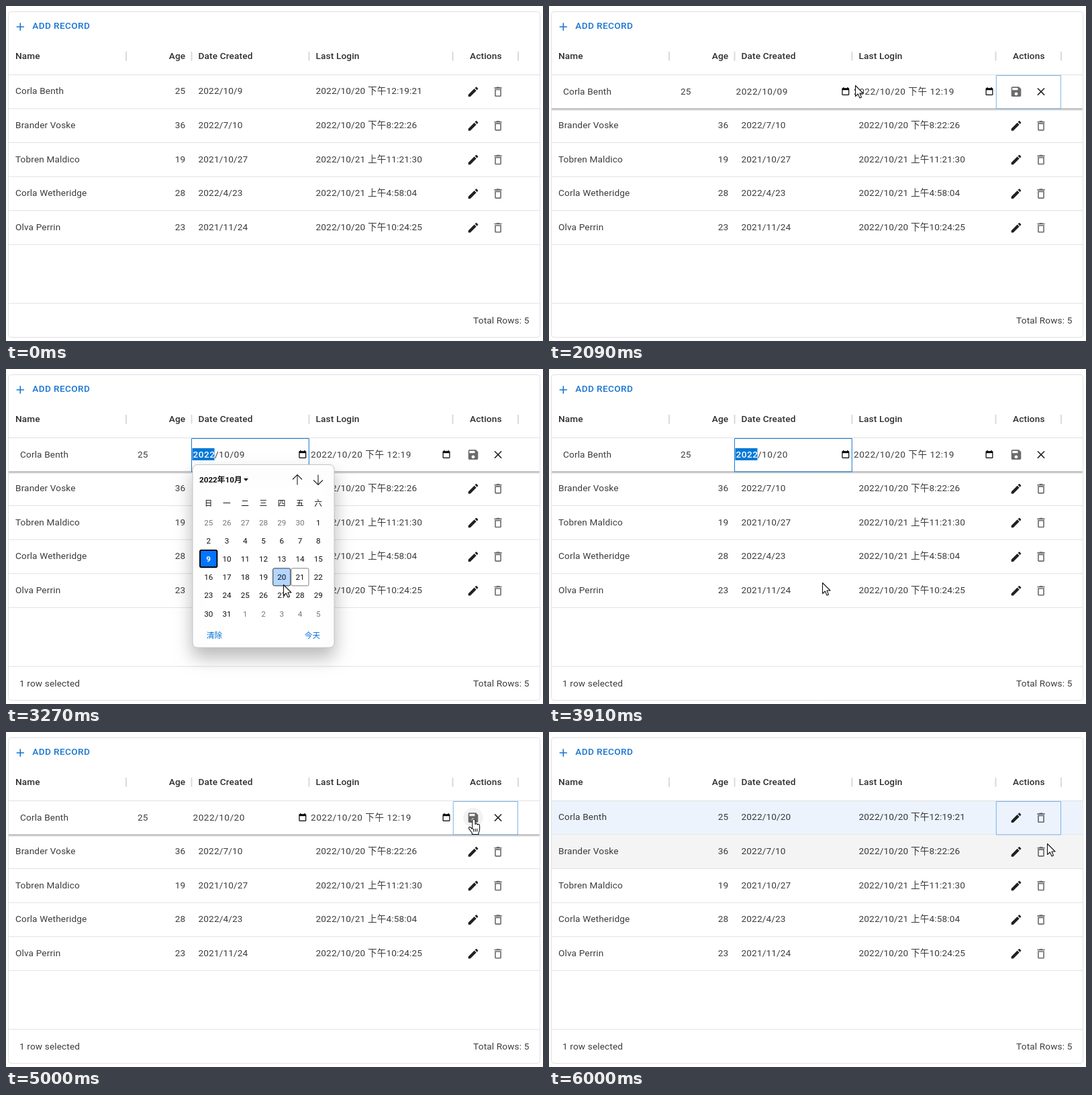
An HTML page with a canvas that plays this animation: 800x499 px, repeating every 6090 ms.

```html
<!DOCTYPE html>
<html lang="en">
<head>
<meta charset="utf-8">
<title>Editable data grid</title>
<style>
html, body { margin: 0; width: 100%; height: 100%; overflow: hidden; background: #fff; }
canvas { display: block; }
</style>
</head>
<body>
<canvas id="stage" width="800" height="499"></canvas>
<script>
const ctx = document.getElementById('stage').getContext('2d');
const LOOP = 6090, STEP = 1000 / 11;
const FAMILY = 'Roboto, "Noto Sans CJK TC", "Noto Sans CJK SC", "Noto Sans CJK JP", sans-serif';
const INK = 'rgba(0,0,0,.87)', BODY = 'rgba(0,0,0,.77)', MUTED = 'rgba(0,0,0,.58)';
const LINE = '#e0e0e0', BLUE = '#1976d2';
const ROW_TOP = 102.5, ROW_H = 50.6, EDIT_X = 696, SECOND_X = 733;

const rows = [
  ['Corla Benth', 25, '2022/10/9', '2022/10/20 下午12:19:21'],
  ['Brander Voske', 36, '2022/7/10', '2022/10/20 下午8:22:26'],
  ['Tobren Maldico', 19, '2021/10/27', '2022/10/21 上午11:21:30'],
  ['Corla Wetheridge', 28, '2022/4/23', '2022/10/21 上午4:58:04'],
  ['Olva Perrin', 23, '2021/11/24', '2022/10/20 下午10:24:25']
];

// Pointer path: step, x, y
const path = [
  [1, 550, 484], [4, 632, 285], [7, 697, 143], [8, 698, 137], [9, 699, 133], [13, 699, 133],
  [17, 587, 133], [23, 456, 118], [24, 449, 113], [25, 445, 120], [26, 443, 124], [30, 443, 124],
  [33, 436, 215], [36, 413, 321], [37, 411, 322], [39, 404, 319], [40, 407, 318], [46, 407, 318],
  [47, 490, 268], [48, 630, 168], [49, 740, 97], [50, 740, 97], [53, 700, 136], [55, 697, 130],
  [58, 697, 130], [63, 766, 226], [66, 742, 166]
];

const icons = {
  add: 'M19 13h-6v6h-2v-6H5v-2h6V5h2v6h6z',
  edit: 'M3 17.25V21h3.75L17.81 9.94l-3.75-3.75zM20.71 7.04c.39-.39.39-1.02 0-1.41l-2.34-2.34c-.39-.39-1.02-.39-1.41 0l-1.83 1.83 3.75 3.75z',
  trash: 'M6 19c0 1.1.9 2 2 2h8c1.1 0 2-.9 2-2V7H6zM8 9h8v10H8zM15.5 4l-1-1h-5l-1 1H5v2h14V4z',
  save: 'M17 3H5c-1.1 0-2 .9-2 2v14c0 1.1.9 2 2 2h14c1.1 0 2-.9 2-2V7zM12 19c-1.66 0-3-1.34-3-3s1.34-3 3-3 3 1.34 3 3-1.34 3-3 3zM15 9H5V5h10z',
  close: 'M19 6.4 17.6 5 12 10.6 6.4 5 5 6.4 10.6 12 5 17.6 6.4 19 12 13.4 17.6 19 19 17.6 13.4 12z',
  calendar: 'M19 4h-1V2h-2v2H8V2H6v2H5c-1.1 0-2 .9-2 2v14c0 1.1.9 2 2 2h14c1.1 0 2-.9 2-2V6c0-1.1-.9-2-2-2zM5 9h14v11H5z'
};
for (const k in icons) icons[k] = new Path2D(icons[k]);
const arrowShape = new Path2D('M.5 .5V16.5L4.3 13 7 19 9.5 17.9 7 12H12Z');
const handShape = new Path2D('M-2.2 2Q-2 0 0 0T2 2V7.5Q2.4 6.4 4 6.6T5.4 8.2Q6 7.2 7.2 7.6T8.6 9.6V15Q8.4 18 7 20V22.5H-2.6V20.5L-7 14.6Q-8.2 12.6-6.8 11.8T-3.8 13L-2.2 14.5Z');

function text(str, x, y, { size = 13.62, weight = 400, color = BODY, align = 'left', gap = .146 } = {}) {
  ctx.font = `${weight} ${size}px ${FAMILY}`;
  ctx.letterSpacing = gap + 'px';
  ctx.textAlign = align;
  ctx.fillStyle = color;
  ctx.fillText(str, x, y);
}

function rect(x, y, w, h, color) {
  ctx.fillStyle = color;
  ctx.fillRect(x, y, w, h);
}

function box(x, y, w, h, stroke, width = 1, radius = 0, fill) {
  ctx.beginPath();
  ctx.roundRect(x, y, w, h, radius);
  if (fill) { ctx.fillStyle = fill; ctx.fill(); }
  ctx.lineWidth = width;
  ctx.strokeStyle = stroke;
  ctx.stroke();
}

function disc(x, y, r, color) {
  ctx.beginPath();
  ctx.arc(x, y, r, 0, 7);
  ctx.fillStyle = color;
  ctx.fill();
}

function icon(name, x, y, color, size = 19.46) {
  ctx.save();
  ctx.translate(x - size / 2, y - size / 2);
  ctx.scale(size / 24, size / 24);
  ctx.fillStyle = color;
  ctx.fill(icons[name], 'evenodd');
  ctx.restore();
}

function pointerAt(n) {
  if (n < 1) return null;
  const i = path.findIndex(p => p[0] >= n);
  const b = path[i], a = path[Math.max(0, i - 1)];
  const k = b === a ? 0 : (n - a[0]) / (b[0] - a[0]);
  return { x: a[1] + (b[1] - a[1]) * k, y: a[2] + (b[2] - a[2]) * k };
}

const rowCenter = i => 127.6 + ROW_H * i;
const near = (p, x, y) => p && Math.hypot(p.x - x, p.y - y) < 15;

function drawFrame(selected) {
  box(3.5, 8.5, 792, 485, LINE, 1, 4);
  icon('add', 21.3, 31, BLUE);
  text('ADD RECORD', 39.3, 34, { weight: 500, color: BLUE, gap: .39 });
  const head = { weight: 500, color: 'rgba(0,0,0,.82)' };
  text('Name', 14, 79, head);
  text('Age', 267.3, 79, { ...head, align: 'right' });
  text('Date Created', 286.5, 79, head);
  text('Last Login', 461.5, 79, head);
  text('Actions', 714.8, 79, { ...head, align: 'center' });
  for (const x of [179, 276.5, 451.5, 665.5, 763]) rect(x - 1, 68, 2, 13.6, '#dadada');
  rect(4, 102, 791, 1, LINE);
  rect(4, 442.5, 791, 1, LINE);
  if (selected) text('1 row selected', 20, 473);
  text('Total Rows: 5', 779.5, 473, { align: 'right' });
}

// The round highlight fades in during the first step of hovering.
function drawActions(names, colors, y, n) {
  [EDIT_X, SECOND_X].forEach((x, i) => {
    if (n >= 11 && near(pointerAt(n), x, y)) {
      disc(x, y, 14.8, `rgba(0,0,0,${near(pointerAt(n - 1), x, y) ? .05 : .015})`);
    }
    icon(names[i], x, y, colors[i]);
  });
}

function drawRow(i, date, n) {
  const [name, age, , login] = rows[i], y = rowCenter(i) + 3.8;
  text(name, 14, y);
  text(age, 267.3, y, { align: 'right' });
  text(date, 286.5, y);
  text(login, 461.5, y);
  drawActions(['edit', 'trash'], [INK, MUTED], rowCenter(i) + .2, n);
}

function drawEditor(date, focused, n) {
  const y = 132, wide = { gap: .5 };
  const shade = ctx.createLinearGradient(0, 152.5, 0, 156.5);
  shade.addColorStop(0, 'rgba(0,0,0,.28)');
  shade.addColorStop(.4, 'rgba(0,0,0,.2)');
  shade.addColorStop(1, 'rgba(0,0,0,0)');
  rect(4, 152.5, 790.5, 4, shade);
  text(rows[0][0], 21, y);
  text('25', 211.5, y, { align: 'right' });
  if (focused) {
    rect(277.5, 118, 33, 18, '#0078d7');
    text('2022', 278.5, y, { gap: .5, weight: 500, color: '#fff' });
    text(date.slice(4), 311, y, wide);
  } else {
    text(date, 278.5, y, wide);
  }
  text('2022/10/20 下午 12:19', 454, y, wide);
  icon('calendar', 441.8, 127, '#000', 14.6);
  icon('calendar', 656, 127, '#000', 14.6);
  drawActions(['save', 'close'], [MUTED, INK], 127.6, n);
}

function drawArrow(x, y, dir) {
  ctx.beginPath();
  ctx.moveTo(x, y - 7.5 * dir);
  ctx.lineTo(x, y + 7.5 * dir);
  ctx.moveTo(x - 7, y + .5 * dir);
  ctx.lineTo(x, y + 7.5 * dir);
  ctx.lineTo(x + 7, y + .5 * dir);
  ctx.lineWidth = 1.1;
  ctx.strokeStyle = '#222';
  ctx.stroke();
}

function drawCalendar(pointer) {
  ctx.save();
  ctx.shadowColor = 'rgba(0,0,0,.27)';
  ctx.shadowBlur = 26;
  ctx.shadowOffsetY = 14;
  box(278, 142.5, 211, 272.5, '#c4c4c4', 1, 7, '#fff');
  ctx.restore();
  const small = { size: 11.7, gap: 0, align: 'center', color: '#101010' };
  text('2022年10月', 288, 169, { ...small, align: 'left', weight: 700 });
  ctx.beginPath();
  ctx.moveTo(354, 163);
  ctx.lineTo(361, 163);
  ctx.lineTo(357.5, 167);
  ctx.fillStyle = '#111';
  ctx.fill();
  drawArrow(434, 165, -1);
  drawArrow(465, 165, 1);
  [...'日一二三四五六'].forEach((d, c) => text(d, 301.7 + 27.25 * c, 203.7, small));
  for (let i = 0; i < 42; i++) {
    const x = 301.7 + 27.25 * (i % 7), y = 228.3 + 27.2 * Math.floor(i / 7);
    const day = i - 5, inMonth = day > 0 && day < 32;
    const label = day < 1 ? day + 30 : day > 31 ? day - 31 : day;
    const hovered = Math.abs(pointer.x - x) < 13.6 && Math.abs(pointer.y - y) < 13.6;
    if (day === 9) box(x - 12.7, y - 12.8, 25.4, 25.4, '#000', 1.9, 2, '#0075ff');
    else if (hovered) box(x - 13, y - 13, 26, 26, '#333', 1, 2, '#b3d6ff');
    else if (day === 21) box(x - 13, y - 13, 26, 26, '#808080', 1, 2);
    text(label, x, y + 4.2, {
      ...small,
      weight: day === 9 ? 700 : 400,
      color: day === 9 ? '#fff' : inMonth ? '#101010' : '#767676'
    });
  }
  text('清除', 310.5, 400.7, { ...small, color: '#0070d8' });
  text('今天', 456.5, 400.7, { ...small, color: '#0070d8' });
}

function drawPointer(p, hand) {
  ctx.save();
  ctx.translate(p.x, p.y);
  const shape = hand ? handShape : arrowShape;
  ctx.lineWidth = 1.1;
  ctx.lineJoin = 'round';
  ctx.fillStyle = '#fff';
  ctx.strokeStyle = '#111';
  ctx.fill(shape);
  ctx.stroke(shape);
  if (hand) {
    ctx.beginPath();
    for (const x of [-.4, 2.2, 4.8]) { ctx.moveTo(x, 14); ctx.lineTo(x, 18.5); }
    ctx.stroke();
  }
  ctx.restore();
}

function draw(n) {
  const pointer = pointerAt(n);
  const editing = n >= 13 && n < 57, saved = n >= 57;
  const dateFocus = n >= 25 && n < 54;
  const hoverRow = n === 11 || n === 12 ? 0
    : saved ? Math.min(1, Math.floor((pointer.y - ROW_TOP) / ROW_H)) : -1;

  rect(0, 0, 800, 499, '#fff');
  for (let i = 0; i < rows.length; i++) {
    const top = ROW_TOP + ROW_H * i;
    const picked = saved && i === 0, hovered = i === hoverRow;
    if (picked) rect(4, top, 790.5, ROW_H, hovered ? '#e3edf9' : '#ecf3fc');
    else if (hovered) rect(4, top, 790.5, ROW_H, '#f4f4f4');
    rect(4, top + ROW_H - .65, 791, .97, LINE);
  }
  drawFrame(n >= 28);

  if (n === 12) disc(EDIT_X, 127.6, 11, 'rgba(0,0,0,.2)');
  if (n >= 57 && n < 60) {
    disc(EDIT_X, 127.6, [7, 11, 14][n - 57], `rgba(0,0,0,${[.24, .24, .1][n - 57]})`);
  }
  rows.forEach((row, i) => {
    if (i === 0 && editing) drawEditor(n < 43 ? '2022/10/09' : '2022/10/20', dateFocus, n);
    else drawRow(i, i === 0 && saved ? '2022/10/20' : row[2], n);
  });

  if (dateFocus) box(276.5, 103.5, 174.8, 49.5, BLUE);
  else if (n >= 11) box(666.3, 103.5, 96.2, 49.5, '#7fb3e6');

  if (n >= 28 && n < 43) drawCalendar(pointer);
  if (pointer) {
    const onButton = rows.some((_, i) =>
      near(pointer, EDIT_X, rowCenter(i)) || near(pointer, SECOND_X, rowCenter(i)));
    drawPointer(pointer, onButton);
  }
}

const start = performance.now();
function tick() {
  const time = (performance.now() - start) % LOOP;
  draw(Math.min(66, Math.floor((time + 6) / STEP)));
  requestAnimationFrame(tick);
}
tick();
</script>
</body>
</html>
```
